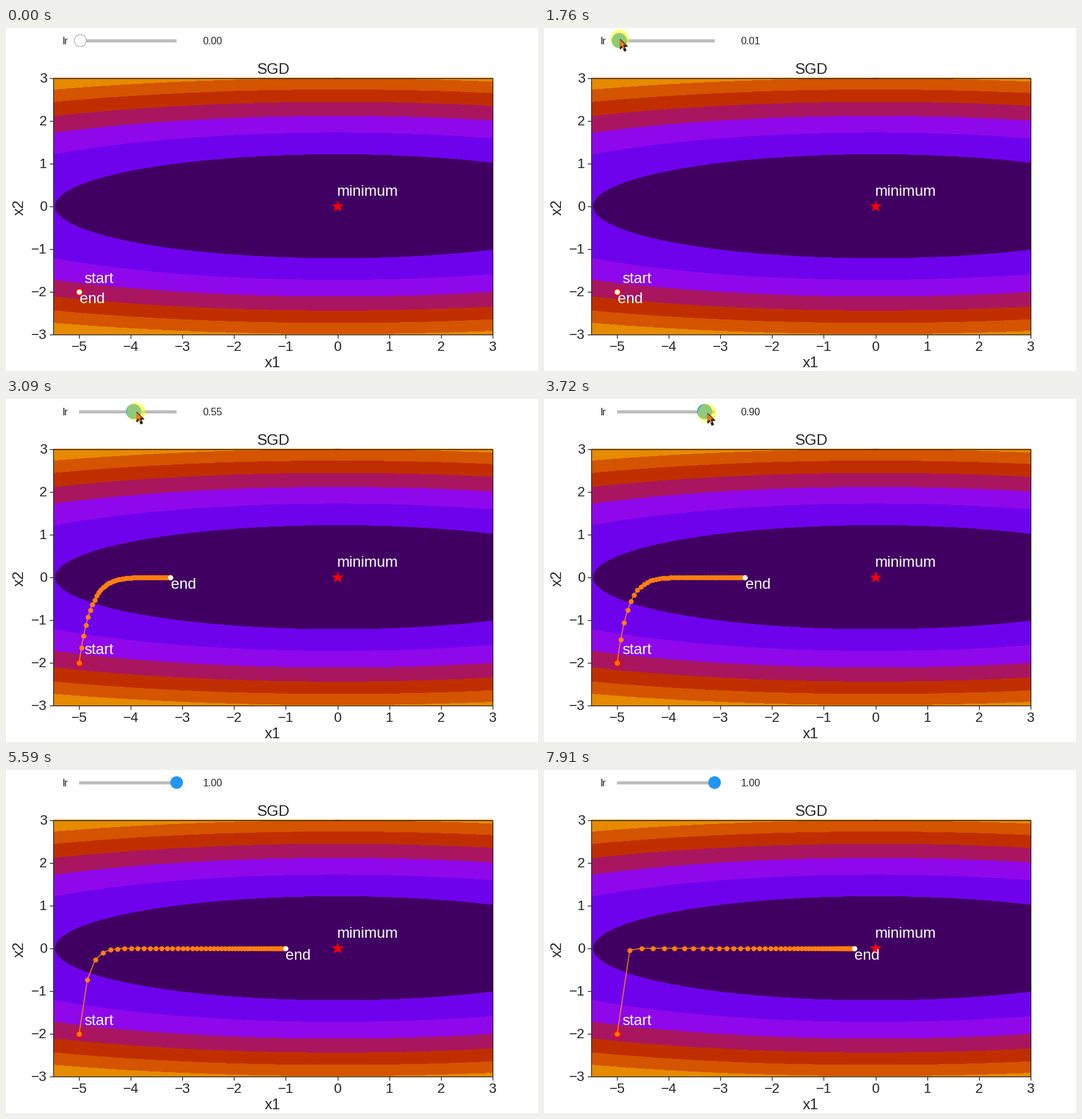
Write a matplotlib script that moves like this. It is 845 by 546 pixels and loops after 8 s.

```python
import numpy as np
import matplotlib.pyplot as plt
from matplotlib.animation import FuncAnimation
from matplotlib.patches import Circle, Polygon, Rectangle

W, H, DPI = 845, 546, 64
PX = 72 / DPI                      # points per pixel
STEP, LOOP = 20, 8000
LEFT, RIGHT, TOP, BOTTOM = 75.2, 772.7, 79.7, 487.7
INK, ORANGE, BLUE, GREY = "#262626", "#ff7f0e", "#2196f3", "#bdbdbd"

plt.rcParams["font.family"] = "Liberation Sans"
fig = plt.figure(figsize=(W / DPI, H / DPI), dpi=DPI, facecolor="white")
ax = fig.add_axes([0, 0, 1, 1])
ax.axis("off")


def sx(x):
    return LEFT + (x + 5.5) * (RIGHT - LEFT) / 8.5


def sy(y):
    return BOTTOM - (y + 3) * (BOTTOM - TOP) / 6


def label(x, y, s, size=24, color=INK, **kw):
    return ax.text(x, y, s, fontsize=size * PX, color=color, va="baseline", **kw)


def line(xs, ys):
    ax.plot(xs, ys, color=INK, lw=1.25 * PX, solid_capstyle="butt")


def dots(x, y, color, size, marker="o", z=5):
    return ax.plot(x, y, marker, color=color, ms=size * PX, mew=0, zorder=z)[0]


# Loss surface
gx, gy = np.meshgrid(np.linspace(-5.5, 3, 86), np.linspace(-3, 3, 61))
ax.contourf(sx(gx), sy(gy), 0.1 * gx**2 + 2 * gy**2,
            levels=np.arange(0, 25, 3), cmap="gnuplot", vmin=0, vmax=24)
ax.set_xlim(0, W)
ax.set_ylim(H, 0)
ax.set_autoscale_on(False)

# Frame, ticks and labels
ax.add_patch(Rectangle((LEFT, TOP), RIGHT - LEFT, BOTTOM - TOP, fill=False,
                       ec=INK, lw=1.25 * PX, zorder=4))
for v in range(-5, 4):
    name = str(v).replace("-", "\u2212")
    line([sx(v)] * 2, [BOTTOM, BOTTOM + 6])
    label(sx(v), BOTTOM + 26, name, 22, ha="center")
    if v >= -3:
        line([LEFT - 6, LEFT], [sy(v)] * 2)
        label(65, sy(v) + 7.5, name, 22, ha="right")
label(424.5, 72.6, "SGD", ha="center")
label(423, 540.4, "x1", ha="center")
label(28, 285, "x2", ha="center", rotation=90, rotation_mode="anchor")

# Descent path
dots([sx(-5)], [sy(-2)], "red", 12)
path, = ax.plot([], [], "o-", color=ORANGE, lw=1.5 * PX, ms=8 * PX, mew=0, zorder=6)
tip_dot = dots([], [], "white", 8, z=7)
dots([sx(0)], [sy(0)], "red", 21, "*", z=7)
label(sx(0) - 0.8, 267.2, "minimum", color="white", zorder=8)
label(sx(-4.9), sy(-1.8), "start", color="white", zorder=8)
end_text = label(0, 0, "end", color="white", zorder=8)

# Slider
label(89.5, 26, "lr", 16, INK)
value = label(312.5, 26, "", 16, INK)
ax.add_patch(Rectangle((116, 18), 155, 4.5, color=GREY, lw=0))
knob = Circle((118, 20), 9.5, lw=PX, zorder=9)
ax.add_patch(knob)

# Mouse pointer with halo
ARROW = np.array([(0, 0), (0, 16), (3.7, 12.6), (6.6, 19.3), (9.6, 18),
                  (6.8, 11.6), (11.8, 11.4)])
halo = Circle((0, 0), 15, fc="yellow", alpha=0.5, lw=0, zorder=10)
shadow = Polygon(ARROW, fc="#201008", ec="#201008", lw=0.8 * PX, zorder=11)
arrow = Polygon(ARROW, fc="#f07a1a", lw=0, zorder=12)
pointer = (halo, shadow, arrow)
for p in pointer:
    ax.add_patch(p)

ENTER, PRESS, DRAG, RELEASE, LEAVE, GONE = 670, 1430, 2055, 3923, 4670, 5050
FIRST_REDRAW, REDRAW_EVERY = 1907, 261
N = np.arange(51)


def mouse(t):
    """Enter, rest on the knob, drag it, drift off and leave at the top."""
    times = (ENTER, 1280, DRAG, RELEASE, LEAVE, GONE)
    return (np.interp(t, times, (17, 117, 122, 275, 336.5, 730)),
            np.interp(t, times, (66, 18, 17, 23, 40.5, -14)))


def slider_rate(t):
    low = 0.01 if t >= 1700 else 0
    return np.clip((t - DRAG) / (RELEASE - DRAG), low, 1)


def plotted_rate(t):
    """The plot catches up with the slider in slow, even redraws."""
    k = (t - FIRST_REDRAW) // REDRAW_EVERY
    if k < 0:
        return 0
    return np.interp(k, (0, 2, 6, 10, 14, 23), (0.01, 0.076, 0.271, 0.435, 0.63, 0.976))


def draw(i):
    t = i * STEP + 10
    rate = plotted_rate(t)
    px, py = sx(-5 * (1 - rate / 20) ** N), sy(-2 * (1 - rate) ** N)
    path.set_data(px, py)
    tip_dot.set_data(px[-1:], py[-1:])
    end_text.set_position((px[-1] + 0.6, py[-1] + 18))

    lr = slider_rate(t)
    mx, my = mouse(t)
    value.set_text(f"{lr:.2f}")
    cx = 118 + 153 * lr
    active = t >= PRESS
    hover = active and np.hypot(mx - cx, my - 20) < 15
    knob.set_center((cx, 20))
    knob.set_radius(12 if hover else 10 if active else 9.5)
    knob.set_facecolor(BLUE if active else "white")
    knob.set_edgecolor("none" if active else "#9e9e9e")

    halo.set_center((mx, my))
    shadow.set_xy(ARROW + (mx + 0.8, my + 0.4))
    arrow.set_xy(ARROW * 0.8 + (mx + 0.3, my + 0.8))
    for p in pointer:
        p.set_visible(ENTER <= t < GONE)
    return path, tip_dot, end_text, value, knob, *pointer


anim = FuncAnimation(fig, draw, frames=LOOP // STEP, interval=STEP,
                     repeat=True, repeat_delay=0, blit=False)
plt.show()
```
